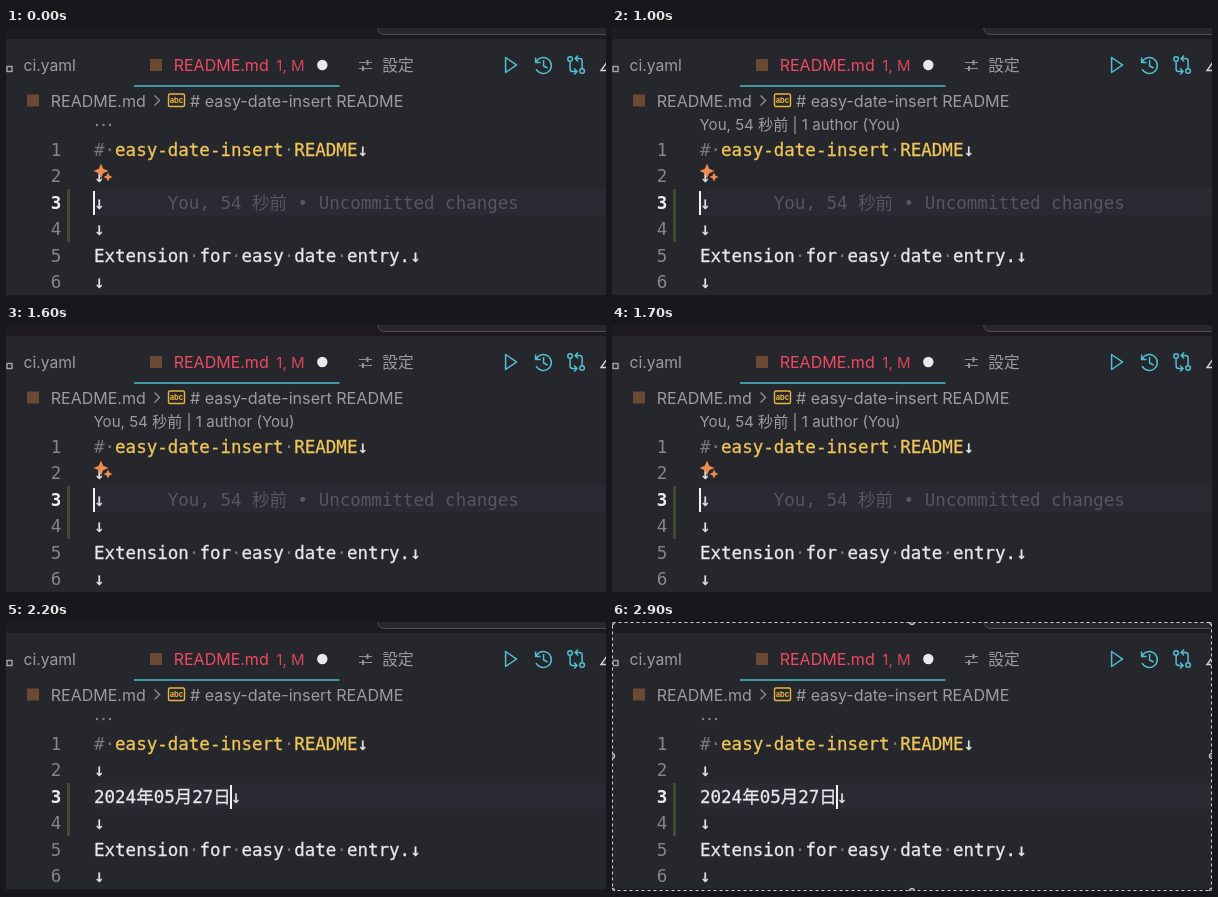
An HTML page that plays this animation: 600x269 px, repeating every 3000 ms.

```html
<!DOCTYPE html>
<html lang="ja">
<head>
<meta charset="utf-8">
<style>
html, body { margin: 0; width: 100%; height: 100%; overflow: hidden; background: #25272c; }
svg { display: block; }
text { white-space: pre; font-family: Inter, "Noto Sans CJK JP", sans-serif; font-size: 16px; fill: #9b9ca2; }
.code text { font-family: "DejaVu Sans Mono", "Noto Sans CJK JP", monospace; font-size: 17.5px; fill: #e8e8ea; }
.code .main { stroke: #e8e8ea; stroke-width: .3; }
.code .num { fill: #85868c; text-anchor: end; }
.code .now { fill: #f0f0f2; font-weight: bold; }
.code .blame { fill: #55575c; }
.dim { fill: #77787d; stroke: none; }
.title { fill: #f0c659; stroke: #f0c659; }
.line { fill: none; stroke-width: 1.4; }
</style>
</head>
<body>
<svg width="600" height="269" viewBox="0 0 600 269">
  <rect width="600" height="269" fill="#25272c"/>
  <rect width="600" height="11" fill="#1e1b20"/>
  <path d="M371.500 -1Q372 6.500 379 6.500H601V-1Z" fill="#29272c" stroke="#504d53"/>
  <rect y="267" width="600" height="2" fill="#1b191d"/>

  <!-- tabs -->
  <rect class="line" x="1" y="38.500" width="5" height="5" stroke="#a5a6aa"/>
  <text x="17.500" y="43" style="font-size:15.700px">ci.yaml</text>
  <rect x="144" y="31" width="12" height="12" fill="#6b4a34"/>
  <text x="167.700" y="43" style="fill:#f04a60">README.md</text>
  <text x="270.300" y="42.500" style="fill:#d8465c;font-size:15px">1, M</text>
  <circle cx="316.300" cy="37" r="5.200" fill="#e9e9eb"/>
  <path class="line" d="M128 58H333.500" stroke="#4bbccb" style="stroke-width:1.600"/>
  <g class="line" stroke="#909197" style="stroke-width:1.200">
    <path d="M353 34.500H366M353 40.500H366"/>
    <path d="M361.500 32V37M357 38V43" style="stroke-width:2"/>
  </g>
  <text x="376.300" y="43" style="font-size:15.700px">設定</text>

  <!-- toolbar -->
  <g class="line" transform="translate(.6)" stroke="#53bfd0" style="stroke-width:1.500" stroke-linejoin="round">
    <path d="M499 29.500V44.500L510 37Z"/>
    <path d="M529.500 34A8 8 0 1 1 529.500 41M529 29.500V34.500H534M537 32V38L541 40"/>
    <circle cx="563.500" cy="31" r="2.300"/>
    <circle cx="575.500" cy="43" r="2.300"/>
    <path d="M563.500 33.500V41Q563.500 43.500 566 43.500H570M567.500 40.500L570.500 43.500L567.500 46.500M575.500 40.500V33Q575.500 30.500 573 30.500H569M571.500 27.500L568.500 30.500L571.500 33.500"/>
  </g>
  <path class="line" d="M601 34L595 42.500H601" stroke="#d5d5d8"/>

  <!-- breadcrumb -->
  <rect x="21" y="66.500" width="12" height="12" fill="#6b4a34"/>
  <text x="44.800" y="78.500">README.md</text>
  <path class="line" d="M148.500 67.500L153.500 72.500L148.500 77.500" stroke="#8d8e94"/>
  <rect class="line" x="162.500" y="66" width="16" height="12.500" rx="1.500" stroke="#e8b53f"/>
  <text x="170.500" y="75" text-anchor="middle" style="fill:#e8b53f;font-size:7.500px;font-weight:bold">abc</text>
  <text x="184" y="78.500" style="font-size:16.150px"># easy-date-insert README</text>

  <!-- editor -->
  <rect x="88" y="161" width="512" height="26.500" fill="#2a2b32"/>
  <rect x="61" y="161" width="3" height="53" fill="#404b31"/>
  <g id="dots" fill="#85868c">
    <circle cx="91" cy="97" r="1.200"/><circle cx="97.500" cy="97" r="1.200"/><circle cx="104" cy="97" r="1.200"/>
  </g>
  <text id="lens" x="87.500" y="102.300" style="font-size:15.100px">You, 54 秒前 | 1 author (You)</text>
  <g class="code">
    <g id="nums"></g>
    <text class="main" x="88" y="128"><tspan class="dim">#·</tspan><tspan class="title">easy-date-insert<tspan class="dim">·</tspan>README</tspan>↓</text>
    <text class="main" x="88" y="154.400">↓</text>
    <text class="main" id="entry" x="88" y="180.800">↓</text>
    <text id="blame" class="blame" x="161.800" y="180.800">You, 54 秒前 • Uncommitted changes</text>
    <text class="main" x="88" y="207.200">↓</text>
    <text class="main" x="88" y="233.600">Extension<tspan class="dim">·</tspan>for<tspan class="dim">·</tspan>easy<tspan class="dim">·</tspan>date<tspan class="dim">·</tspan>entry.↓</text>
    <text class="main" x="88" y="260">↓</text>
  </g>
  <path id="spark" fill="#ee8a50" d="M95 135.500L97.200 140.800L102.500 143L97.200 145.200L95 150.500L92.800 145.200L87.500 143L92.800 140.800ZM102 144.500L103.400 147.600L106.500 149L103.400 150.400L102 153.500L100.600 150.400L97.500 149L100.600 147.600Z"/>
  <rect id="caret" y="163" width="2" height="24" fill="#f2f2f4"/>

  <!-- capture selection -->
  <g id="frame">
    <rect class="line" x=".5" y=".5" width="599" height="268" stroke="#222" style="stroke-width:1"/>
    <rect class="line" x=".5" y=".5" width="599" height="268" stroke="#d0d0d0" stroke-dasharray="3 3" style="stroke-width:1"/>
    <g id="grips" fill="#77777a" stroke="#d0d0d0"></g>
  </g>
</svg>
<script>
const $ = id => document.getElementById(id);
const LOOP = 3000, LENS_ON = 200, INSERT = 1800, LENS_OFF = 2200, SELECT = 2700, BLINK = 500;

for (let i = 0; i < 6; i++)
  $("nums").innerHTML += `<text class="num ${i === 2 ? "now" : ""}" x="55.3" y="${128 + i * 26.4}">${i + 1}</text>`;
for (const x of [0, 300, 600])
  for (const y of [0, 134, 269])
    if (x !== 300 || y !== 134) $("grips").innerHTML += `<circle cx="${x}" cy="${y}" r="2.8"/>`;

const show = (id, on) => $(id).style.display = on ? "" : "none";

function draw(now) {
  const t = now % LOOP;
  const typed = t >= INSERT;
  const lens = t >= LENS_ON && t < LENS_OFF;
  // typing restarts the blink
  const phase = typed ? t - INSERT : t + 400;
  show("lens", lens);
  show("dots", !lens);
  show("blame", !typed);
  show("spark", !typed);
  show("caret", phase % (2 * BLINK) < BLINK);
  show("frame", t >= SELECT);
  $("entry").textContent = typed ? "2024年05月27日↓" : "↓";
  $("caret").setAttribute("x", typed ? 224 : 87);
  requestAnimationFrame(draw);
}
draw(performance.now());
</script>
</body>
</html>
```
